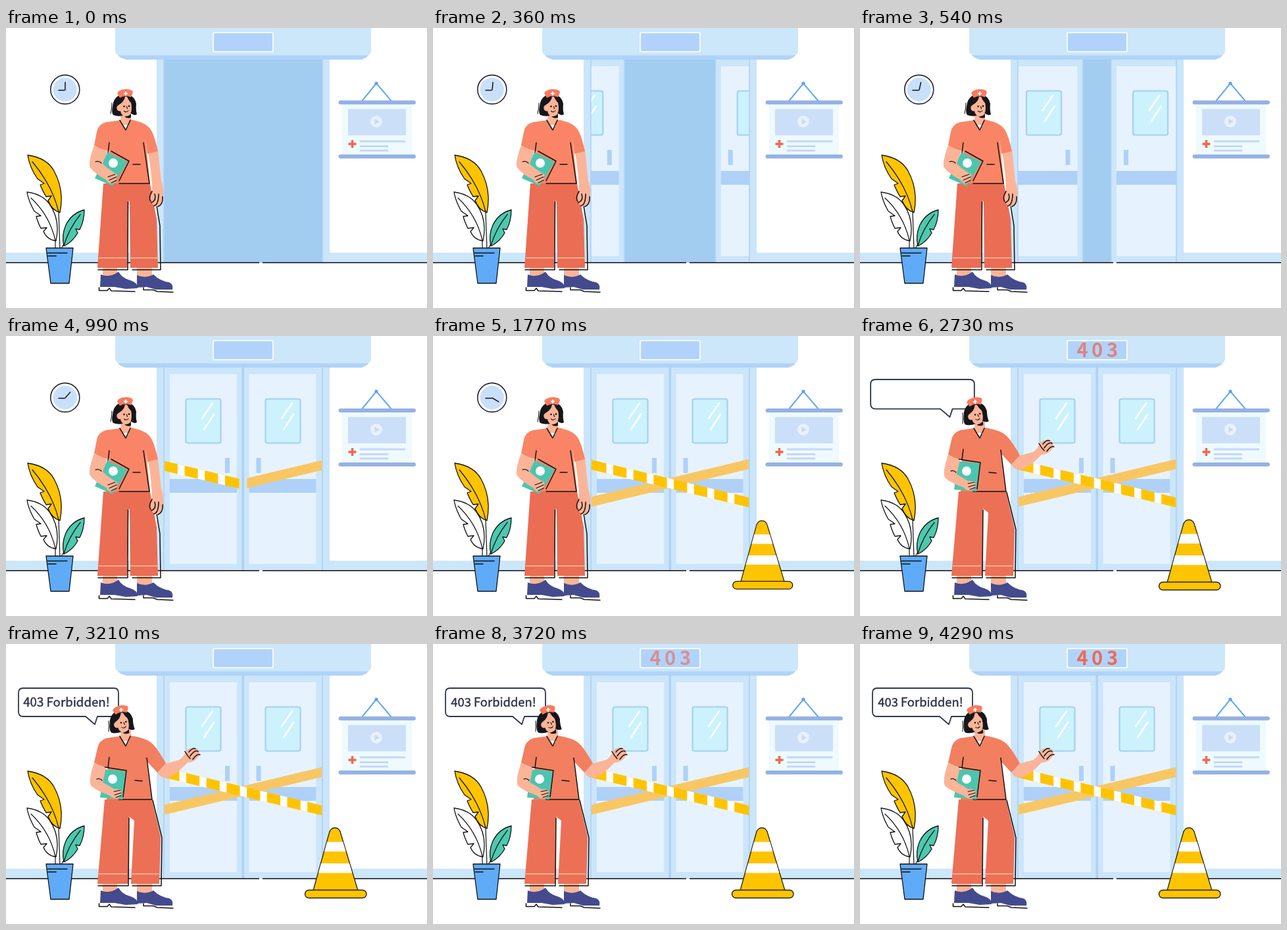
Recreate the animation shown at these times as an HTML page. Size 640x425 px, loop 4500 ms.

```html
<!DOCTYPE html>
<html lang="en">
<head>
<meta charset="utf-8">
<title>403 Forbidden</title>
<style>
html, body { margin: 0; height: 100%; overflow: hidden; background: #fff; }
svg { display: block; width: 640px; height: 425px; }
text { font-family: "Noto Sans CJK SC", "Noto Sans", sans-serif; text-anchor: middle; }
.ink { fill: none; stroke: #111; stroke-width: 1.5; stroke-linecap: round; stroke-linejoin: round; }
.thin { stroke-width: 1.2; }
.leaf { stroke: #111; stroke-width: 1.3; stroke-linejoin: round; }
.skin { fill: #fbb498; }
</style>
</head>
<body>
<svg viewBox="0 0 640 425">
  <defs>
    <clipPath id="opening"><path d="M240 48H481V356H240Z"/></clipPath>
    <clipPath id="tapeArea"><path d="M241 150H480V300H241Z"/></clipPath>
    <g id="door">
      <path fill="#cbe5fb" d="M240 48H360V356H240Z"/>
      <path fill="#e6f3fe" d="M249 58H351V346H249Z"/>
      <path fill="#afd1f7" d="M249 217H351V238H249ZM333 185H340V208H333Z"/>
      <path fill="none" stroke="#aed2f4" stroke-width="2" d="M359.5 48V356"/>
    </g>
    <g id="pane">
      <rect x="273.5" y="95.5" width="53" height="67" rx="3" fill="#ccf2fe" stroke="#a6d0f3" stroke-width="2.2"/>
      <path stroke="#fff" stroke-width="2.5" stroke-linecap="round" d="M298 125L314 102M301 142L316 119"/>
    </g>
  </defs>

  <!-- wall and doorway -->
  <path fill="#cce7fa" d="M0 341H640V356H0Z"/>
  <path fill="#cbe5fa" d="M229 46H492V356H229Z"/>
  <path fill="#a2ccf0" d="M240 48H481V356H240Z"/>
  <g clip-path="url(#opening)">
    <g id="left"><use href="#door"/><use href="#pane"/></g>
    <g id="right"><use href="#door" transform="matrix(-1 0 0 1 720.5 0)"/><use href="#pane" x="121"/></g>
  </g>
  <path stroke="#aed2f3" stroke-width="1.6" d="M240 48V356M481 48V356"/>
  <path class="ink" style="stroke-linecap:butt" d="M0 356.3H385M390 356.3H640"/>
  <path fill="#cce6fa" d="M166 0H555V36Q553 43 540 48H183Q169 43 166 36Z"/>
  <path fill="#afd3f8" d="M170 41.5H551Q547 46 540 48H183Q174 46 170 41.5Z"/>
  <rect x="315" y="7" width="91" height="29" rx="2" fill="#b1d3fb" stroke="#f2f9ff" stroke-width="2.2"/>
  <text id="code" x="338 360.5 383.5" y="31.5" font-size="29" font-weight="700" fill="#ec6a50">403</text>

  <!-- poster -->
  <path fill="none" stroke="#62a8ef" stroke-width="2" d="M541 111L563 84L586 111"/>
  <circle cx="563" cy="84" r="2.6" fill="#5aa2ee"/>
  <path fill="#eefafe" d="M511 115H617V193H511Z"/>
  <path fill="#cbdff8" d="M520 123H608V163H520Z"/>
  <path stroke="#95b2e4" stroke-width="6" stroke-linecap="round" d="M508.5 113H620M508.5 195H620"/>
  <circle cx="563" cy="142" r="9" fill="#e8f1fc"/>
  <path fill="#c4daf6" d="M560.5 137.5L567.5 142L560.5 146.5Z"/>
  <path stroke="#ec6a50" stroke-width="3.4" d="M526.5 170V182M520.5 176H532.5"/>
  <path stroke="#c5d8f7" stroke-width="3" stroke-linecap="round" d="M539 172H606M539 179.5H580M539 186H580"/>

  <g id="clock">
    <circle cx="89.8" cy="93.4" r="22" fill="#fff" stroke="#222638" stroke-width="1.6"/>
    <circle cx="89.8" cy="93.4" r="18" fill="#c9e0fa"/>
    <path class="ink" d="M89 94.5H80"/>
    <path class="ink" id="minute" d="M90 94V82.5"/>
  </g>

  <!-- plant -->
  <path class="ink thin" d="M80 278L82 336M75 320V336M88 328L83 336"/>
  <path class="leaf" fill="#ffc400" d="M33 193Q62 197 73 217Q89 246 82 280Q70 277 64 262L69 255L61 256Q55 246 52 238L58 236L48 229Q36 212 33 193Z"/>
  <path class="ink thin" d="M40 203Q71 240 80 279"/>
  <path class="leaf" fill="#fff" d="M32 249Q55 252 66 267Q83 291 76 323Q63 322 57 309L62 303L53 304Q48 294 46 286L53 285L43 278Q34 262 32 249Z"/>
  <path class="ink thin" d="M38 258Q66 284 75 322"/>
  <path class="leaf" fill="#4cc9ae" d="M119 276Q119 293 112 306L106 305L109 311Q102 324 88 331Q84 315 91 299Q100 281 119 276Z"/>
  <path class="ink thin" d="M113 283Q96 304 88 330"/>
  <path class="leaf" fill="#5fabf8" d="M61 334H102L96 387.5H68Z"/>
  <path class="ink" d="M63 341.5H93M64 346H76"/>

  <!-- barrier -->
  <g clip-path="url(#tapeArea)">
    <path id="plain" fill="#f8c763" d="M480 187V202L241 259V244Z"/>
    <g id="striped">
      <path fill="#ffc400" d="M241 188V203L480 260V245Z"/>
      <path id="stripes" fill="#fff"/>
    </g>
  </g>
  <g id="cone">
    <path fill="#ffc400" stroke="#222" stroke-width="1.3" d="M467 374L491 288Q493 279 500 279Q507 279 509 288L535 374Z"/>
    <path fill="#fff" d="M488 300.5H512.3L516.6 315H484ZM479 333H522L526.2 347.5H475Z"/>
    <rect x="454.5" y="373.5" width="93.5" height="12" rx="6" fill="#ffc400" stroke="#222" stroke-width="1.4"/>
  </g>

  <!-- speech bubble -->
  <path id="bubble" fill="#fff" stroke="#30374f" stroke-width="1.8" stroke-linejoin="round" d="M26 67H164Q171 67 171 74V103Q171 110 164 110H139L135 122L121 110H26Q19 110 19 103V74Q19 67 26 67Z"/>
  <text id="speech" x="92" y="95" font-size="18.4" fill="#30344c" stroke="#30344c" stroke-width=".45">403 Forbidden!</text>

  <!-- nurse -->
  <path class="skin" d="M147 362H169V380H147ZM199 362H222V382H199Z"/>
  <path fill="#434b8e" d="M144 374Q157 380 171 370Q177 380 189 383Q200 386 200 395L182 396L165 393L143 393ZM199 375Q212 381 224 374Q234 384 248 386Q255 389 253 397L228 397L214 393L199 394Z"/>
  <path class="ink" d="M141.500 394V398.500L154 398.500L157 395L160 399L196 400M209 394V397.500L224 397.500L230 400L254 401"/>
  <path id="pants" d="M148 236H219L229 290L231 364H189L188 264L186.5 262L184 364H139Z" data-to="M150 236H222L235 293L233 364H190L195 268L187 262L186 364H139Z"/>
  <path fill="none" stroke="#f9bea0" stroke-width="1.6" d="M141 349H184M189 349H232"/>
  <path class="ink" d="M185.500 264L185 367L140 367M229 270L234 300L235 367L192 367" data-to="M187 264L186 367L140 367M223 237L237 294L236 367L192 367"/>
  <path class="skin" d="M216 188L231 185L236 232Q240 242 239 256Q239 266 234 270Q224 273 221 264Q217 256 222 246Q222 225 216 188Z" data-to="M229 193L241 182L263 176Q270 172 274 162Q282 155 291 159Q298 166 290 174Q284 180 276 180Q240 218 229 193Z"/>
  <path class="ink" d="M222 248Q216 258 220 263M226 252Q229 262 221 265M232 252Q232 268 225 270M238 256Q239 268 231 271" data-to="M272 163Q276 170 280 174M278 164Q284 157 288 159M280 170Q287 160 292 163M284 175Q290 166 295 168"/>
  <path class="skin" d="M175 128H190V140L182 153L174 140Z"/>
  <path id="shirt" d="M173 140L152 143Q140 146 138 158L134 178Q144 185 157 187L153 236L219 236L212 168L215 191L231 187Q225 160 219 153Q212 143 189 139L182 153Z" data-to="M173 140L152 143Q141 147 139 158L134 180Q144 186 155 188L153 236L222 236L214 178L230 195L243 181Q230 158 222 151Q214 143 189 139L182 153Z"/>
  <path fill="#fff" d="M177 147H187L182 154Z"/>
  <path class="ink" d="M173 140L182 155L189 140"/>
  <path class="ink" d="M157 174L155 190M209 174L218 236L172 236M193 207L204 207" data-to="M157 172L155 188M214 173L222 236L172 236M196 207L207 208"/>
  <path fill="#4cc5ae" d="M154 189L185 203L162 240L135 228Z" data-to="M149 190L182 193L177 236L143 233Z"/>
  <path class="ink" d="M160 187L187 202L172 232" data-to="M150 187L183 192L178 232"/>
  <circle id="badge" cy="205" r="7" fill="#fff"/>
  <path class="skin" d="M134 178Q145 185 154 187L147 206Q153 212 162 218L169 222Q170 232 160 237Q154 234 152 230Q136 222 128 212Q124 206 134 178Z" data-to="M134 180Q145 186 152 188L147 210Q155 214 164 220L175 221Q178 231 168 235Q160 234 158 230Q140 224 130 216Q124 210 134 180Z"/>
  <path class="ink thin" d="M136 203Q141 201 145 205M155 226L166 222M157 231L168 226M160 235L168 231" data-to="M138 205Q142 203 146 207M164 224L174 222M165 229L175 226M167 233L175 230"/>
  <g id="head">
    <path fill="#16161a" d="M172 102Q163 107 162 119Q160 129 163 132Q170 135 178 133L189 129Q195 134 199 131Q197 124 198 115Q196 104 186 101Z"/>
    <path class="ink" style="stroke-width:1" d="M161 114Q161 122 159 130"/>
    <path class="skin" d="M181 104Q180 112 171 117Q167 119 169 124Q171 127 174 126Q175 133 182 135Q191 132 191 122Q191 112 187 105Z"/>
    <path fill="#16161a" d="M184 104Q187 112 193 116L192 104ZM180 134.500Q187 134 190 130V136Q185 138 180 134.500Z"/>
    <circle cx="179.500" cy="119" r="1.2"/><circle cx="187" cy="118.500" r="1.2"/>
    <path class="ink" style="stroke-width:1.1" d="M183.500 119L184.500 122.500M179.500 126Q183 129 186 125.500"/>
    <path fill="#f87b5e" d="M171 96Q181 90 192 95L193 98L190 105Q181 101 173 106L169 99Z"/>
    <path stroke="#fff" stroke-width="1.8" d="M182 96.500V102.500M179 99.500H185"/>
  </g>
</svg>
<script>
const LOOP = 4500, TAPE_SLOPE = 0.2385;
const $ = id => document.getElementById(id);
const set = (id, name, value) => $(id).setAttribute(name, value);
const lerp = (a, b, p) => a + (b - a) * p;
const span = (t, start, end) => Math.min(1, Math.max(0, (t - start) / (end - start)));
const sine = p => (1 - Math.cos(Math.PI * p)) / 2;
const backOut = p => p <= 0 ? 0 : 1 + 2.4 * (p - 1) ** 3 + 1.4 * (p - 1) ** 2;
const rgb = (a, b, p) => `rgb(${a.map((v, i) => Math.round(lerp(v, b[i], p)))})`;

// White bars, cut vertically along the sloping tape
set('stripes', 'd', Array.from({ length: 7 }, (_, i) => {
  const x = 263.5 + i * 30.7, y = 188 + (x - 241) * TAPE_SLOPE;
  return `M${x} ${y}l10.5 2.5v15l-10.5 -2.5Z`;
}).join(''));

// Each morphing path holds its resting pose in d and its raised pose in data-to
const NUMBER = /-?[\d.]+/g;
const numbers = d => d.match(NUMBER).map(Number);
const morphs = [...document.querySelectorAll('[data-to]')].map(el => {
  const d = el.getAttribute('d');
  return { el, d, from: numbers(d), to: numbers(el.dataset.to) };
});

function pose(p) {
  for (const { el, d, from, to } of morphs) {
    let i = 0;
    el.setAttribute('d', d.replace(NUMBER, () => lerp(from[i], to[i++], p).toFixed(2)));
  }
  set('shirt', 'fill', rgb([249, 133, 102], [241, 127, 96], p));
  set('pants', 'fill', rgb([234, 109, 84], [236, 112, 86], p));
  set('badge', 'cx', lerp(163, 162, p));
  set('head', 'transform', `translate(${-2 * p}) rotate(${-7 * p} 182 140)`);
}

function pop(id, x, y, t, start) {
  const s = backOut(span(t, start, start + 390));
  set(id, 'transform', `translate(${x} ${y}) scale(${s}) translate(${-x} ${-y})`);
}

function draw(now) {
  const t = now % LOOP;
  const gap = 120 * (1 - sine(span(t, 60, 720)));
  set('left', 'transform', `translate(${-gap})`);
  set('right', 'transform', `translate(${gap})`);

  const away = 240 * (1 - sine(span(t, 735, 1262))), lift = -away * 0.225;
  set('striped', 'transform', `translate(${-away} ${lift})`);
  set('plain', 'transform', `translate(${away} ${lift})`);

  set('minute', 'transform', `rotate(${360 * sine(t / LOOP)} 90 94)`);
  set('clock', 'opacity', 1 - span(t, 2420, 2540));
  pose(sine(span(t, 1830, 2220)));
  pop('cone', 501, 332, t, 1620);
  pop('bubble', 95, 94, t, 2420);
  pop('speech', 92, 89, t, 3040);
  set('code', 'opacity', t < 2490 ? 0 : sine((t - 2490) / 360));
  requestAnimationFrame(draw);
}
draw(performance.now());
</script>
</body>
</html>
```
